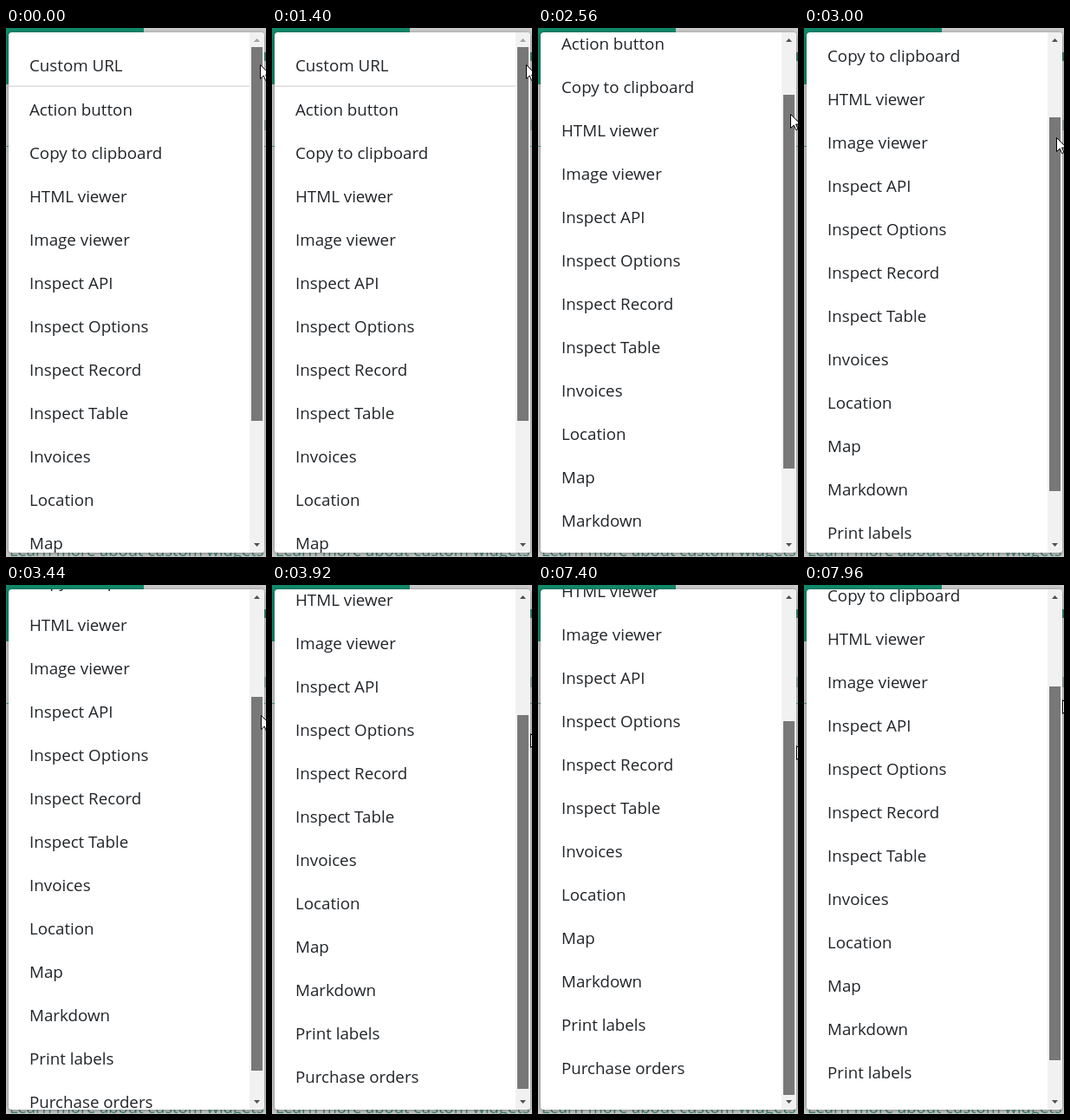
Write an HTML page that moves like this. It is 300x610 px and loops after 8 s.

```html
<!DOCTYPE html>
<html lang="en">
<head>
<meta charset="utf-8">
<title>Widget menu</title>
<style>
html, body { margin: 0; width: 100%; height: 100%; overflow: hidden; }
body { position: relative; background: #cbcbcb; font: 18.75px "Open Sans", "Noto Sans", sans-serif; color: #212529; }
body div, body svg { position: absolute; }
.teal { left: 0; top: 0; width: 159px; height: 65px; background: #118a6b; }
.rule { left: 0; top: 136px; width: 300px; height: 1px; background: #4e9c88; }
.mark { left: 298px; width: 2px; }
.link { left: 4px; top: 587px; font-size: 18.4px; line-height: 30px; white-space: nowrap; color: #3f8474; text-decoration: underline; }
.panel { left: 3px; top: 5px; width: 295px; height: 600px; background: #fff; border-radius: 4px; overflow: hidden; }
.shade { left: 3px; top: 5px; width: 295px; height: 600px; border-radius: 4px; box-shadow: 0 1px 5px rgba(0,0,0,.4); }
#list { left: 0; top: 0; width: 278px; will-change: transform; }
#list div { left: 24px; line-height: 50px; white-space: nowrap; }
#list .sep { left: 0; top: 61px; width: 278px; height: 2px; background: linear-gradient(#e9e9e9, #e0e0e0); }
.track { left: 278px; top: 0; width: 17px; height: 600px; background: #f1f1f1; }
#thumb { left: 280px; top: 17px; width: 13px; height: 431px; background: #787878; }
.arrow { left: 278px; width: 17px; height: 17px; }
#cursor { left: 0; top: 0; width: 14px; height: 21px; overflow: visible; }
</style>
</head>
<body>
<div class="teal"></div>
<div class="rule"></div>
<div class="mark" style="top:28px;height:10px;background:#35806e"></div>
<div class="mark" style="top:106px;height:12px;background:#8fa8a2"></div>
<div class="link">Learn more about custom widgets</div>
<div class="shade"></div>
<div class="panel">
  <div id="list"><div class="sep"></div></div>
  <div class="track"></div>
  <div id="thumb"></div>
  <svg class="arrow" style="top:0" viewBox="0 0 17 17"><path id="up" d="M5 11 8.5 7 12 11Z"/></svg>
  <svg class="arrow" style="top:583px" viewBox="0 0 17 17"><path d="M5 6 8.5 10 12 6Z" fill="#505050"/></svg>
</div>
<svg id="cursor" viewBox="0 0 14 21"><path d="M.5.5V16.5L4.2 13 6.6 18.6 9 17.6 6.6 12H11.8Z" fill="#fff" stroke="#000"/></svg>
<script>
const LOOP = 8000, STEP = 40;
const TOP = 22, TRAVEL = 135, MAX_SCROLL = 187;
const labels = ["Custom URL", "Action button", "Copy to clipboard", "HTML viewer", "Image viewer",
  "Inspect API", "Inspect Options", "Inspect Record", "Inspect Table", "Invoices", "Location",
  "Map", "Markdown", "Print labels", "Purchase orders"];

// time, thumb top, cursor x, cursor y
const keys = [
  [0, 22, 293, 42],
  [1440, 22, 293, 42],
  [2080, 50, 291, 70],
  [3000, 103, 291, 126],
  [3920, 150, 298, 171],
  [4400, 157, 298, 185],
  [7400, 157, 298, 185],
  [7960, 117, 298, 132],
  [8000, 114, 298, 128]
];

const $ = id => document.getElementById(id);
const list = $("list"), thumb = $("thumb"), up = $("up"), cursor = $("cursor");

labels.forEach((text, i) => {
  const row = document.createElement("div");
  row.textContent = text;
  row.style.top = 13 + i * 50 + (i ? 1 : 0) + "px";
  list.append(row);
});

const secant = (i, c) => (keys[i + 1][c] - keys[i][c]) / (keys[i + 1][0] - keys[i][0]);

// Harmonic mean of neighbouring slopes keeps the curve free of overshoot
function slope(i, c) {
  if (i === 0 || i === keys.length - 1) return secant(Math.max(0, i - 1), c);
  const a = secant(i - 1, c), b = secant(i, c);
  return a * b > 0 ? 2 * a * b / (a + b) : 0;
}

function sample(t, c) {
  let i = 0;
  while (i < keys.length - 2 && t >= keys[i + 1][0]) i++;
  const h = keys[i + 1][0] - keys[i][0], u = (t - keys[i][0]) / h, v = 1 - u;
  return keys[i][c] * v * v * (1 + 2 * u) + keys[i + 1][c] * u * u * (3 - 2 * u)
    + h * u * v * (slope(i, c) * v - slope(i + 1, c) * u);
}

function draw(now) {
  const t = Math.floor((now % LOOP) / STEP) * STEP;
  const y = sample(t, 1) - TOP;
  const scroll = Math.round(y * MAX_SCROLL / TRAVEL);
  list.style.transform = `translateY(${-scroll}px)`;
  thumb.style.transform = `translateY(${Math.round(y)}px)`;
  up.setAttribute("fill", scroll ? "#505050" : "#a3a3a3");
  cursor.style.transform = `translate(${Math.round(sample(t, 2))}px, ${Math.round(sample(t, 3))}px)`;
}

const start = performance.now();
function tick() {
  draw(performance.now() - start);
  requestAnimationFrame(tick);
}
tick();
</script>
</body>
</html>
```
